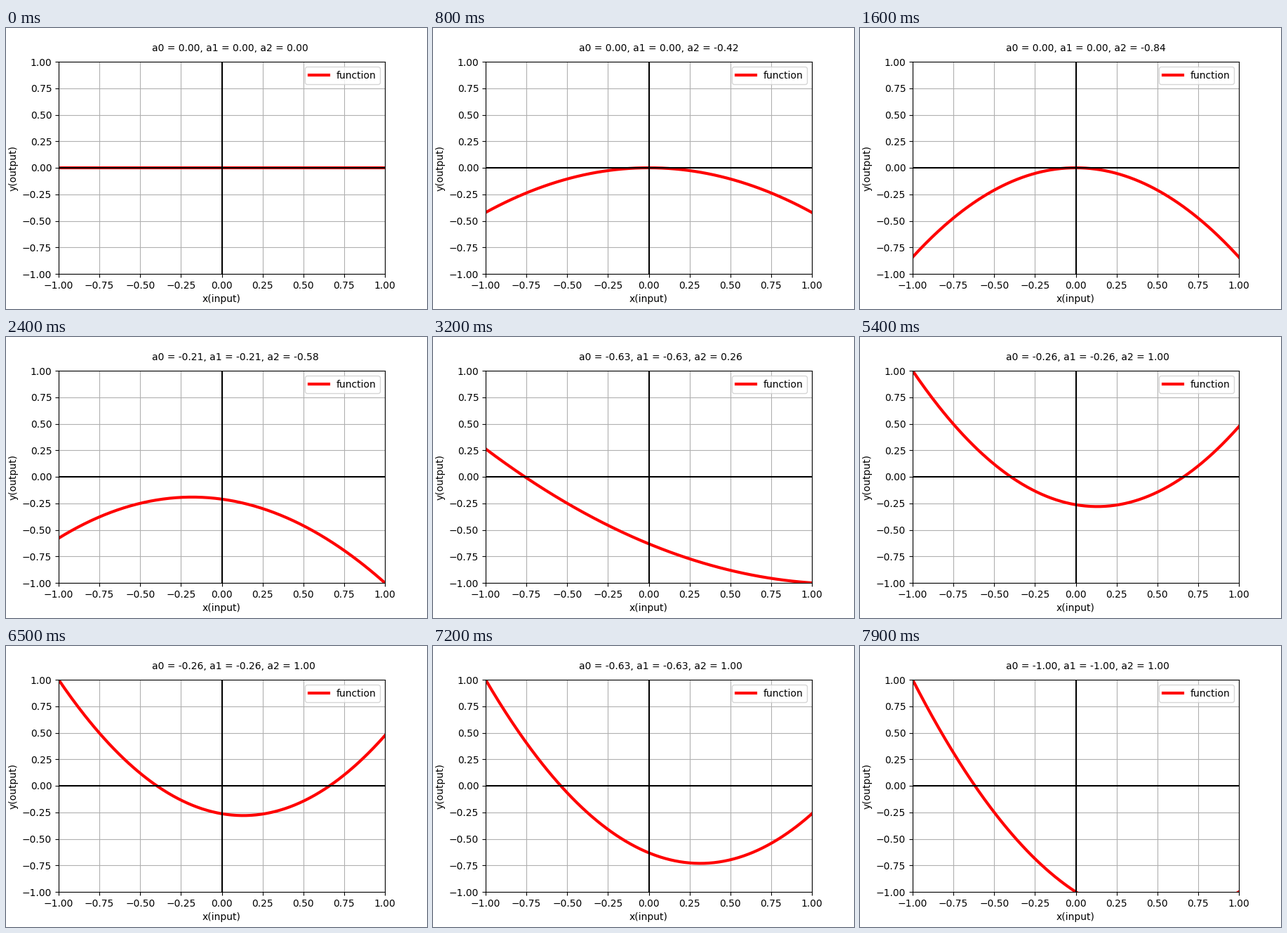
Recreate the animation shown at these times as a matplotlib script. Size 600x400 px, loop 8000 ms.

```python
import numpy as np
import matplotlib.pyplot as plt
from matplotlib.animation import FuncAnimation

plt.rcParams["font.family"] = "DejaVu Sans"

STEPS = 20
INTERVAL = 100
# Coefficients (a0, a1, a2) at the ends of each sweep
KEYS = np.array([(0, 0, 0), (0, 0, -1), (-1, -1, 1), (0, 0, 1), (-1, -1, 1)], float)
FRAMES = STEPS * (len(KEYS) - 1)

x = np.linspace(-1, 1, 201)

fig, ax = plt.subplots(figsize=(6, 4), dpi=100)
fig.subplots_adjust(left=0.125, right=0.9, bottom=0.125, top=0.88)
ax.set(xlim=(-1, 1), ylim=(-1, 1), xlabel="x(input)", ylabel="y(output)")
ax.grid(True)

curve, = ax.plot(x, 0 * x, color="red", linewidth=3, label="function")
ax.axhline(0, color="black", linewidth=1.5)
ax.axvline(0, color="black", linewidth=1.5)
ax.legend(loc="upper right")
title = ax.text(-0.43, 1.1, "", fontsize=10)


def coefficients(frame):
    # Each sweep includes both ends, so its last pose is held for one more frame
    sweep, step = divmod(frame, STEPS)
    t = step / (STEPS - 1)
    return KEYS[sweep] * (1 - t) + KEYS[sweep + 1] * t + 0.0


def update(frame):
    a0, a1, a2 = coefficients(frame)
    curve.set_ydata(a0 + a1 * x + a2 * x**2)
    title.set_text(f"a0 = {a0:.2f}, a1 = {a1:.2f}, a2 = {a2:.2f}")
    return curve, title


anim = FuncAnimation(fig, update, frames=FRAMES, interval=INTERVAL,
                     init_func=lambda: update(0), repeat=True, repeat_delay=0)
plt.show()
```
